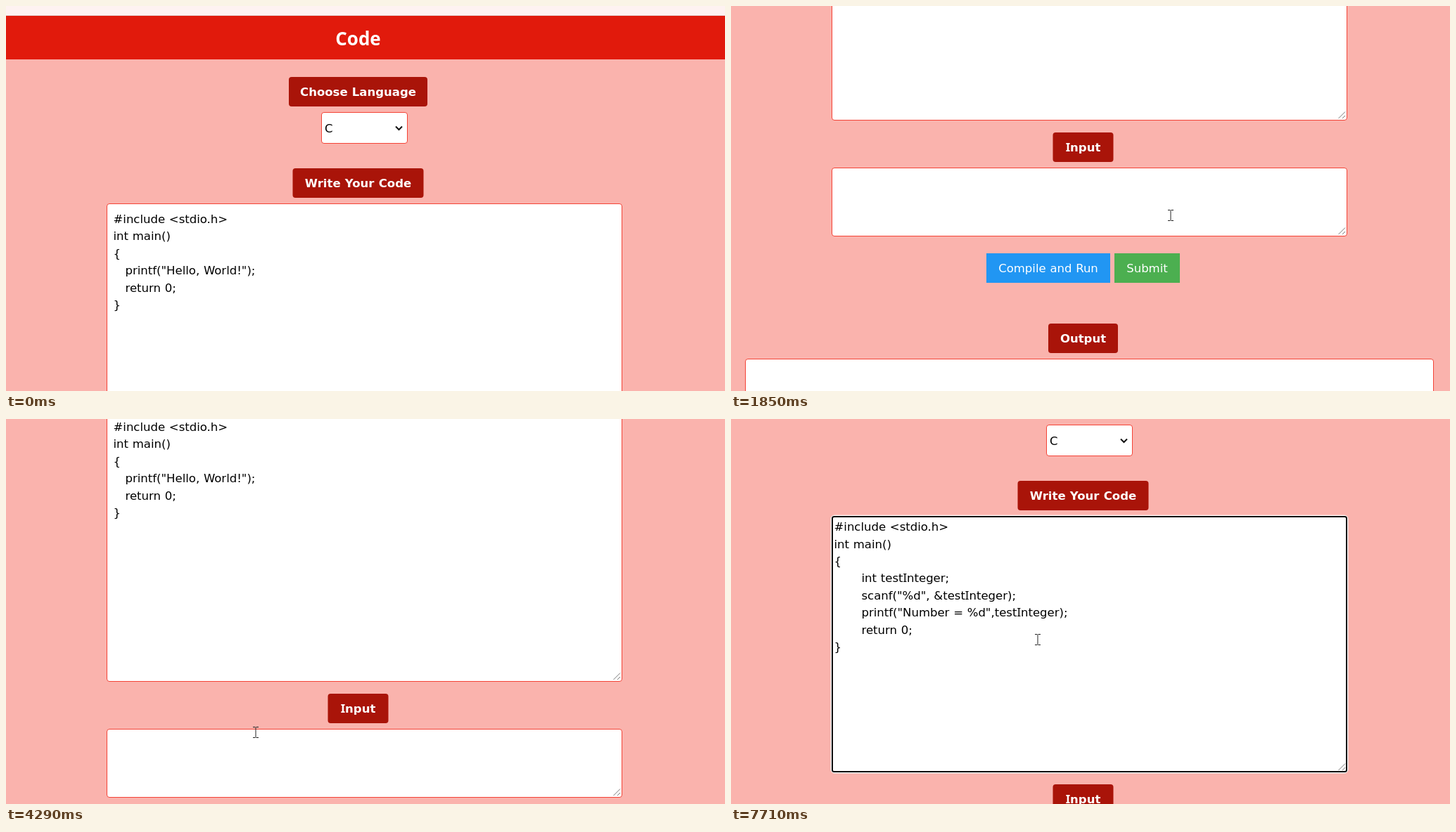
Recreate the animation shown at these times as an HTML page. Size 1022 px wide and 548 px high, loop 8 s.

```html
<!DOCTYPE html>
<html lang="en">
<head>
<meta charset="utf-8">
<title>Code</title>
<style>
  html, body { margin: 0; width: 100%; height: 100%; overflow: hidden; background: #fab3ad; }
  svg { display: block; width: 100%; height: 100%; }
  text { font: 16.5px "DejaVu Sans", sans-serif; word-spacing: .5px; }
  .serif-i { font-family: "Noto Sans", sans-serif; }
  .label { font-weight: bold; fill: #fff; text-anchor: middle; }
  .plain { fill: #fff; text-anchor: middle; }
  .title { font: bold 26px "Open Sans", sans-serif; fill: #fff; text-anchor: middle; }
  .box { fill: #fff; stroke: #f44336; }
  .grip { fill: none; stroke: #777; }
</style>
</head>
<body>
<svg id="stage" viewBox="0 0 1022 548"></svg>
<script>
const LOOP = 8000;
const LINE = 24.4;
const TEXT_X = 152.5, TEXT_Y = 309;
const CARET_ROW = 10;

const hello = [[0, '#include <stdio.h>'], [0, 'int main()'], [0, '{'],
  [17, 'printf("Hello, World!");'], [17, 'return 0;'], [0, '}']];
const number = [[0, '#include <stdio.h>'], [0, 'int main()'], [0, '{'],
  [39, 'int testInteger;'], [39, 'scanf("%d", &testInteger);'],
  [39, 'printf("Number = %d",testInteger);'], [39, 'return 0;'], [0, '}']];

// [start, end, steps]: the picture advances in held steps inside each burst
const bursts = [[70, 300, 4], [530, 680, 3], [990, 1550, 8], [1850, 2470, 9], [2710, 3030, 5],
  [3900, 4520, 9], [4750, 5540, 11], [5610, 5610, 1], [7340, 7710, 6]];

const scrollKeys = [[470, 0], [605, 90], [680, 122], [950, 122], [1070, 216], [1390, 440],
  [1550, 488], [1850, 503], [2005, 612], [2083, 631], [3900, 631], [3978, 596],
  [4287, 292], [4443, 164], [4520, 143]];

const pointerKeys = [[70, 896, 506], [147, 748, 392], [300, 623, 297], [2083, 623, 297],
  [2315, 560, 262], [2470, 531, 250], [2710, 531, 250], [2870, 440, 350], [3030, 353, 445],
  [4520, 353, 445], [4829, 336, 416], [4987, 333.5, 411.5], [5066, 333, 411],
  [5303, 225, 290], [5540, 92, 154], [5610, 86, 134], [7266, 86, 134], [7710, 434, 313]];

const esc = s => s.replace(/&/g, '&amp;').replace(/</g, '&lt;');
const glyphs = s => esc(s).replace(/I/g, '<tspan class="serif-i">I</tspan>');
const text = (x, y, s, cls = '') => `<text x="${x}" y="${y}" class="${cls}">${glyphs(s)}</text>`;
const rect = (x, y, w, h, attrs = '') => `<rect x="${x}" y="${y}" width="${w}" height="${h}" ${attrs}/>`;
const label = (y, w, s) =>
  rect(500.5 - w / 2, y, w, 42, 'rx="4" fill="#a91409"') + text(500.5, y + 27.4, s, 'label');
const grip = (x, y, id = '') =>
  `<path id="${id}" class="grip" transform="translate(${x} ${y})" d="M-12-2.5l9.5-9.5M-6.5-2.5l4-4"/>`;
const lines = list => list.map(([dx, s], i) => text(TEXT_X + dx, TEXT_Y + i * LINE, s)).join('');
const ring = (x, y, w, h, id) => `<g id="${id}" fill="none">` +
  rect(x, y, w, h, 'rx="3" stroke="#fff" stroke-width="4.5"') +
  rect(x, y, w, h, 'rx="2.5" stroke="#101010" stroke-width="2"') + '</g>';

const stage = document.getElementById('stage');
stage.innerHTML = `
<defs><clipPath id="selClip"><path id="selShape"/></clipPath></defs>
${rect(0, 0, 1022, 548, 'fill="#fab3ad"')}
<g id="page">
  ${rect(0, 0, 1022, 13, 'fill="#fef2f1"')}
  ${rect(0, 13, 1022, 1, 'fill="#e3cfcd"')}
  ${rect(0, 14, 1022, 62, 'fill="#e11a0c"')}
  ${text(500.5, 56, 'Code', 'title')}
  ${label(101, 197, 'Choose Language')}
  ${rect(448.5, 151.5, 122, 44, 'rx="3.5" class="box"')}
  ${text(453, 180, 'C')}
  <path d="M554 171.5l4.5 4.5 4.5-4.5" fill="none" stroke="#111" stroke-width="2"/>
  ${label(231, 186, 'Write Your Code')}
  ${rect(143.5, 281.5, 732, 384, 'id="code" rx="3.5" class="box"')}
  ${ring(144, 282, 731, 383, 'codeRing')}
  ${grip(875.5, 665.5, 'codeGrip')}
  <g id="hello">${lines(hello)}</g>
  <path id="selFill" fill="#0078d7"/>
  <g style="fill:#fff" clip-path="url(#selClip)">${lines(hello)}</g>
  <g id="number" transform="translate(-6 -6.7)">${lines(number)}</g>
  <rect id="caret" width="1" height="20.5"/>
  <g id="lower">
    ${label(683, 86, 'Input')}
    ${rect(143.5, 733.5, 732, 97, 'rx="3.5" class="box"')}
    ${grip(875.5, 830.5)}
    ${rect(363, 855, 176, 42, 'fill="#2196f3"')}
    ${ring(363, 855, 176, 42, 'runRing')}
    ${text(451, 882, 'Compile and Run', 'plain')}
    ${rect(545, 855, 93, 42, 'fill="#4caf50"')}
    ${text(591.5, 882, 'Submit', 'plain')}
    ${label(955, 99, 'Output')}
    ${rect(20.5, 1005.5, 978, 146, 'rx="3.5" class="box"')}
    ${grip(998.5, 1151.5)}
    <g id="loading">${text(32, 1036, 'Loading...')}</g>
    <g id="result">${text(32, 1085, 'Hello, World!')}</g>
  </g>
</g>
<g id="pointer">
  <circle id="press" r="14.7" fill="#ff0" fill-opacity=".5"/>
  <path id="beam" transform="translate(2 1)" fill="none" stroke="#222"
    d="M-4-7.5h3.5M.5-7.5h3.5M0-7v14M-4 7.5h3.5M.5 7.5h3.5"/>
  <path id="arrow" fill="#fff" stroke="#000" d="M.5.5V16l3.4-3.4 2.4 5.8 2.3-1-2.4-5.6H11Z"/>
  <path id="hand" fill="#fff" stroke="#000" stroke-linejoin="round"
    d="M-1.5 11V1.5q0-2 1.7-2t1.7 2V7q3-1 3.2.6 3-.6 3.2 1 2.7-.3 2.7 1.8V14q0 3-2 6H1.5Q0 17-4.5 12q0-2.500 3-1Z"/>
</g>`;

const $ = Object.fromEntries([...stage.querySelectorAll('[id]')].map(e => [e.id, e]));
const show = (el, on) => el.setAttribute('visibility', on ? 'visible' : 'hidden');
const move = (el, x, y) => el.setAttribute('transform', `translate(${x} ${y})`);
const between = (v, a, b) => v >= a && v < b;

function held(t) {
  let time = 0;
  for (const [a, b, n] of bursts) {
    if (t < a) break;
    const dt = n > 1 ? (b - a) / (n - 1) : 1;
    time = Math.min(b, a + Math.floor((t - a + 10) / dt) * dt);
  }
  return time;
}

function track(keys, t, col = 1) {
  const i = keys.findIndex(k => k[0] > t);
  if (i < 0) return keys[keys.length - 1][col];
  if (i === 0) return keys[0][col];
  const a = keys[i - 1], b = keys[i];
  return a[col] + (b[col] - a[col]) * (t - a[0]) / (b[0] - a[0]);
}

// Area from the pointer down to the caret line, as stacked row rectangles
function selection(x, y) {
  const row = Math.floor((y - 292) / LINE);
  let d = '';
  for (let i = Math.max(row, 0); i < CARET_ROW; i++) {
    const node = $.hello.children[i];
    const end = TEXT_X + (node ? hello[i][0] + node.getComputedTextLength() : 0);
    const from = i === row ? Math.min(Math.max(x, TEXT_X), end) : TEXT_X;
    d += `M${from} ${292 + i * LINE}H${end + 6}v${LINE}H${from}Z`;
  }
  return d;
}

function draw(t) {
  const time = held(t);
  const scroll = Math.round(track(scrollKeys, time));
  const x = track(pointerKeys, time), y = track(pointerKeys, time, 2);
  const pageY = y + scroll;
  const cleared = t >= 5840, pasted = t >= 7190;
  const dragging = between(t, 5056, 5840);
  const focused = t >= 4898;
  const cut = cleared ? 20 : 0;

  move($.page, 0, -scroll);
  move($.lower, 0, -cut);
  move($.codeGrip, 875.5, 665.5 - cut);
  $.code.setAttribute('height', 384 - cut);
  for (const r of $.codeRing.children) r.setAttribute('height', 383 - cut);
  show($.codeRing, focused);
  show($.runRing, between(t, 2710, 4898));
  show($.loading, between(t, 2780, 3180));
  show($.result, t >= 3180);
  show($.hello, !cleared);
  show($.number, pasted);

  const sel = dragging ? selection(x, pageY) : '';
  $.selFill.setAttribute('d', sel);
  $.selShape.setAttribute('d', sel);

  const blink = between(t, 5840, 6410) || between(t, 6940, 7710);
  show($.caret, cleared ? blink : focused && !sel);
  const row = pasted ? 7 : cleared ? 0 : CARET_ROW;
  $.caret.setAttribute('x', cleared ? (pasted ? 157 : 146) : 153);
  $.caret.setAttribute('y', TEXT_Y - (cleared ? 23.2 : 16.5) + row * LINE);

  const seen = t >= 70 && !between(t, 5840, 6090);
  const overRun = between(x, 363, 539) && between(pageY, 855, 897);
  const inField = between(x, 143, 876) &&
    (between(pageY, 281, 666 - cut) || between(pageY, 733 - cut, 831 - cut)) ||
    between(x, 20, 999) && between(pageY, 1005, 1152);
  const beam = dragging || inField;
  move($.pointer, x, y);
  show($.press, between(t, 2710, 2780) || between(t, 4898, 5770));
  show($.beam, seen && beam);
  show($.hand, seen && !beam && overRun);
  show($.arrow, seen && !beam && !overRun);
}

const start = performance.now();
function frame() {
  draw((performance.now() - start) % LOOP);
  requestAnimationFrame(frame);
}
frame();
</script>
</body>
</html>
```
